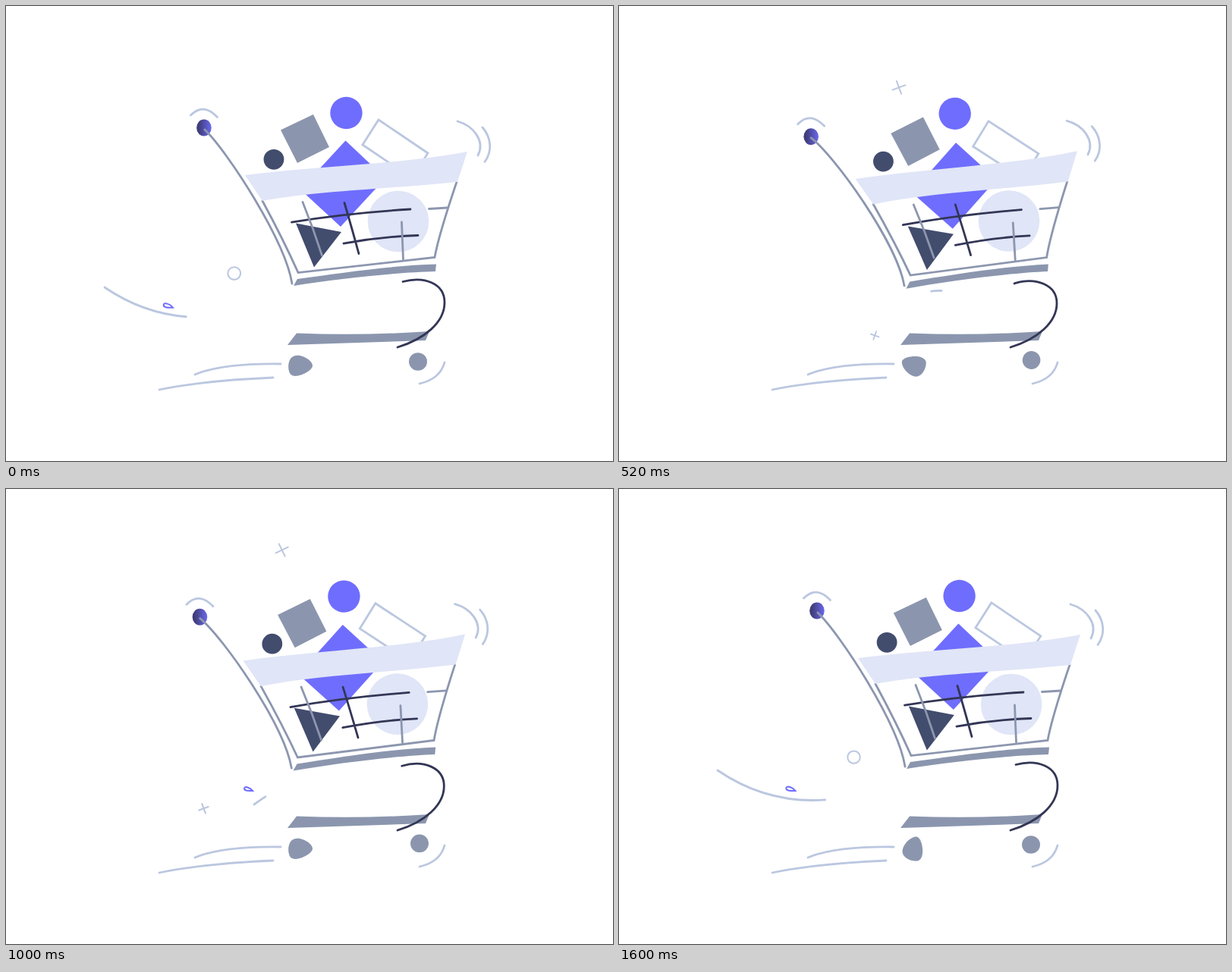
These frames come from a looping animation (800x600 px, 1640 ms). An HTML page:

```html
<!DOCTYPE html>
<html lang="en">
<head>
<meta charset="utf-8">
<title>Rolling cart</title>
<style>
  html, body { margin: 0; width: 100%; height: 100%; overflow: hidden; background: #fff; }
  svg { display: block; width: 100vw; height: 100vh; }
  .line { fill: none; stroke-width: 2.8; stroke-linecap: round; }
  .butt { stroke-linecap: butt; }
  .pale { stroke: #bbc7e0; }
  .grey { stroke: #8c96af; }
  .ink { stroke: #333655; }
  .thin { stroke-width: 2; }
  .slate { fill: #8b96ae; }
  .navy { fill: #424c6d; }
  .violet { fill: #6f6dfd; }
  .mist { fill: #e0e5f7; }
</style>
</head>
<body>
<svg viewBox="0 0 800 600">
  <defs>
    <linearGradient id="knobFill">
      <stop offset=".15" stop-color="#3f3d78"/>
      <stop offset="1" stop-color="#6b68ee"/>
    </linearGradient>
  </defs>

  <g class="line pale">
    <path d="M249 486Q285 471 362 472M202 506Q260 494 352 490M545 498Q572 492 578 470"/>
    <path id="gustA" pathLength="1" d="M425 375.5C395 374 360 392 327 416"/>
    <path id="gustB" pathLength="1" d="M315 403C255 418 190 412 130 371"/>
    <path id="gustC" pathLength="1" d="M325 447C280 412 205 403 145 407"/>
    <g class="thin">
      <path id="plus1" d="M-9 0H9M0-9V9"/>
      <path id="plus2" d="M-9 0H9M0-9V9"/>
      <path id="plus3" d="M-6 0H6M0-6V6"/>
      <circle id="ring" r="8"/>
    </g>
  </g>
  <path id="drop" class="line" stroke="#6f6dfd" vector-effect="non-scaling-stroke" style="stroke-width:2"
        d="M8.5 2.3C3-4-8.5-6-8.5-1C-8.5 4-2 3.2 8.5 2.3Z"/>

  <path class="slate" d="M371 447L383 431.5Q470 435 558 429L553 441Z"/>
  <path id="bigWheel" class="slate"
        d="M-15 7C-17-1-15-12-6-13C4-14 16-6 16 0C16 6 2 14-6 14C-11 14-14 12-15 7Z"/>
  <ellipse id="smallWheel" class="slate" cx="-1" cy=".8" rx="12" ry="11.8"/>
  <path id="spring" class="line ink"/>

  <g id="solids">
    <path class="violet" d="M447.5 177.5L500 227L441 291L388 242Z"/>
    <path class="line pale butt" d="M470 183L491 150L556 194L535 227Z"/>
    <path class="slate" d="M405 143L426 186L384 207L362 163.5Z"/>
    <path class="navy" d="M382 286.5L442 298L406 344.5Z"/>
  </g>
  <g id="rounds">
    <circle class="violet" cx="448.5" cy="141" r="21.2"/>
    <circle class="navy" cx="353" cy="202.3" r="13.4"/>
    <circle class="mist" cx="517" cy="284" r="40.3"/>
  </g>

  <g id="basket">
    <path class="line grey" d="M338 257Q366 309 385 351.5L565 331.5Q570 303 594 232"/>
    <path class="mist" d="M315 223C410 211 520 209 608 192L595 232C510 241 410 243 338 257Z"/>
    <path class="slate" d="M379 369L384 360C440 352 510 342 567 340.5L566 350C520 351 440 359 379 369Z"/>
    <path class="line ink" d="M376.500 285Q450 273 533 268M445 313Q495 304 543 302.500M446 259.500Q455 290 465 326.500"/>
    <path class="line grey" d="M391 258.500Q405 293 416.500 329M521.500 285L523.500 334M557.500 267.500L582 266"/>
    <path class="line pale" d="M595 152C616 158 632 178 622 197M628 160C640 174 641 192 631 205.500"/>
  </g>

  <g id="knob">
    <ellipse cx="261" cy="160.5" rx="9.8" ry="11" fill="url(#knobFill)"/>
    <path class="line pale" d="M243.500 144Q260 127 278.500 146.500"/>
  </g>
  <path id="handle" class="line grey"/>
</svg>

<script>
const LOOP = 1640, ROCK = 400;
const el = id => document.getElementById(id);
const set = (id, name, value) => el(id).setAttribute(name, value);
const mix = (a, b, q) => a + (b - a) * q;
const clamp = q => Math.min(1, Math.max(0, q));

const place = (id, x, y, angle = 0, scale = 1) =>
  set(id, 'transform', `translate(${x} ${y}) rotate(${angle}) scale(${scale})`);

// Resolves every a:b pair in path data to a point between the two poses
const blend = (d, p) => d.replace(/(-?[\d.]+):(-?[\d.]+)/g, (_, a, b) => mix(+a, +b, p));

// 0 = handle raised, 1 = handle lowered; quick drop, slower return
function rock(t) {
  const k = (t / ROCK + 0.04) % 1, fall = 0.28;
  const u = k < fall ? k / fall : 1 + (k - fall) / (1 - fall);
  return ((1 - Math.cos(Math.PI * u)) / 2 - 0.05) / 0.95;
}

function drawCart(t) {
  const p = rock(t), sway = Math.sin(2 * Math.PI * t / LOOP);
  const tilt = `rotate(${-1.15 * p} 565 400)`;
  set('basket', 'transform', tilt);
  set('solids', 'transform', `translate(${sway} ${0.4 * sway}) ${tilt}`);
  set('rounds', 'transform', `translate(${-0.8 * sway} ${-1.5 * p}) ${tilt}`);
  place('knob', -8 * p, 12 * p);
  set('handle', 'd', blend('M262:253 163:174C292:285 192:199 368:366 309:312 377:376 366:369', p));
  set('spring', 'd', blend('M523:521 363.5:366C552:550 356:357 578:577 366:368 578:577 391:392C578:577 417 552 439 516 450', p));
  place('bigWheel', 388, 474, 1.08 * t);
  place('smallWheel', 544, 468.2, 0.9 * t);
}

// Calls draw with the age of an effect, which may run across the loop point
function during(id, t, start, life, draw) {
  const age = (t - start + LOOP) % LOOP, visible = age > 0 && age < life;
  el(id).style.display = visible ? '' : 'none';
  if (visible) draw(age);
}

// A stroke that draws itself on and, a moment later, off again
function gust(id, t, start, sweep) {
  const lag = 190;
  during(id, t, start, sweep + lag, age => {
    const tail = clamp((age - lag) / sweep);
    set(id, 'stroke-dasharray', `${clamp(age / sweep) - tail} 3`);
    set(id, 'stroke-dashoffset', -tail);
  });
}

const linear = q => q;
const gather = q => q ** 1.9;
const late = q => q ** 3.2;
const whip = q => q ** 14;

// Debris blown from one point to another, popping in and out
function fly(id, t, start, life, [x0, y0], [x1, y1], easeX, easeY, turn = [0, 0], size = linear) {
  during(id, t, start, life, age => {
    const q = age / life, pop = Math.min(1, age / 40, (life - age) / 20);
    place(id, mix(x0, x1, easeX(q)), mix(y0, y1, easeY(q)), mix(...turn, q), pop * size(q));
  });
}

function drawWind(t) {
  gust('gustA', t, 470, 410);
  gust('gustB', t, 1360, 225);
  gust('gustC', t, 1690, 150);

  const full = () => 1;
  fly('plus1', t, 480, 380, [393, 115], [170, 45], linear, linear, [-30, 60], full);
  fly('plus2', t, 960, 420, [392, 86], [102, 29], linear, linear, [-35, 60], full);
  fly('plus3', t, 420, 780, [340, 435], [201, 411], gather, gather, [28, -37], q => 0.9 + 0.25 * q);
  fly('ring', t, 1280, 770, [344.5, 356], [160, 317], gather, late, [0, 0], q => 0.89 + 0.33 * q);
  fly('drop', t, 920, 940, [321, 396], [51, 372],
    q => 0.66 * q * q + 0.34 * whip(q), whip, [6, 6], q => 0.66 + 0.1 * q + 0.26 * whip(q));
}

const begin = performance.now();
function tick(now) {
  const t = Math.max(0, now - begin) % LOOP;
  drawCart(t);
  drawWind(t);
  requestAnimationFrame(tick);
}
tick(begin);
</script>
</body>
</html>
```
